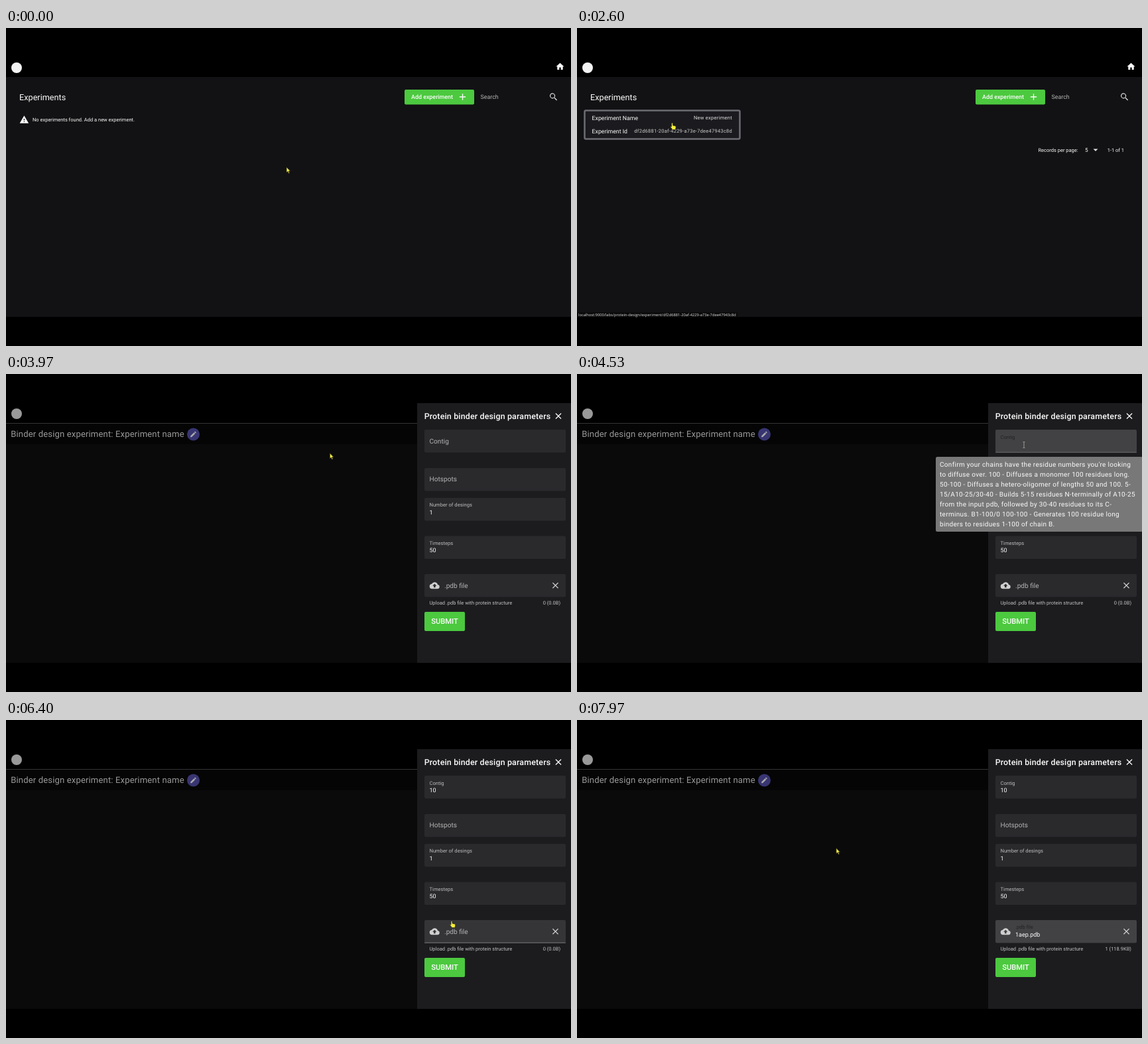
Write an HTML page that moves like this. It is 852 by 480 pixels and loops after 8000 ms.

```html
<!DOCTYPE html>
<html lang="en">
<head>
<meta charset="utf-8">
<title>Experiments</title>
<style>
  html, body { margin: 0; width: 100%; height: 100%; overflow: hidden; background: #000; }
  svg { display: block; }
  text { font-family: Roboto, sans-serif; text-rendering: geometricPrecision; white-space: pre; }
  .sys text, text.sys { font-family: "Open Sans", "Noto Sans", sans-serif; }
</style>
</head>
<body>
<svg id="stage" width="852" height="480" viewBox="0 0 852 480"></svg>
<script>
const LOOP = 8000;
const LIGHT = '#fcfcfc', MUTED = '#b4b4b4', GREEN = '#4cc93f', INK = '#444';
const PAGE = '#121214', PANEL = '#1c1c1f', FIELD = '#2a2a2d', FIELD_ACTIVE = '#424245';
const RUN_ID = 'df2d6881-20af-4229-a73e-7dee47943c8d';

const ICONS = {
  home: 'M10 20v-6h4v6h5v-8h3L12 3 2 12h3v8z',
  add: 'M19 13h-6v6h-2v-6H5v-2h6V5h2v6h6z',
  search: 'M15.5 14h-.8l-.3-.3A6.5 6.5 0 1 0 13.7 14.4l.3.3v.8l5 5 1.5-1.5zm-6 0a4.5 4.5 0 1 1 0-9 4.5 4.5 0 0 1 0 9z',
  warning: 'M1 21h22L12 2zm12-3h-2v-2h2zm0-4h-2v-4h2z',
  edit: 'M3 17.25V21h3.75L17.8 9.94l-3.75-3.75zM20.7 7.04a1 1 0 0 0 0-1.41l-2.34-2.34a1 1 0 0 0-1.41 0l-1.83 1.83 3.75 3.75z',
  close: 'M19 6.4 17.6 5 12 10.6 6.4 5 5 6.4 10.6 12 5 17.6 6.4 19 12 13.4 17.6 19 19 17.6 13.4 12z',
  upload: 'M19.35 10.04A7.5 7.5 0 0 0 5.35 8.04 6 6 0 0 0 6 20h13a5 5 0 0 0 .35-9.96zM14 13v4h-4v-4H7l5-5 5 5z',
};

// Markup helpers
const text = (x, y, str, size, fill = LIGHT, attrs = '') =>
  `<text x="${x}" y="${y}" font-size="${size}" fill="${fill}" ${attrs}>${str}</text>`;
const rect = (x, y, w, h, fill, attrs = '') =>
  `<rect x="${x}" y="${y}" width="${w}" height="${h}" fill="${fill}" ${attrs}/>`;
const circle = (x, y, r, fill, attrs = '') => `<circle cx="${x}" cy="${y}" r="${r}" fill="${fill}" ${attrs}/>`;
const line = (d, stroke, width = 1, attrs = '') =>
  `<path d="${d}" fill="none" stroke="${stroke}" stroke-width="${width}" ${attrs}/>`;
const group = (id, ...parts) => `<g id="${id}">${parts.join('')}</g>`;
const icon = (name, x, y, size, fill = LIGHT) =>
  `<path fill="${fill}" fill-rule="evenodd" d="${ICONS[name]}" transform="translate(${x - size / 2} ${y - size / 2}) scale(${size / 24})"/>`;
const MEDIUM = 'font-weight="500"', END = 'text-anchor="end"', MIDDLE = 'text-anchor="middle"';
const WIDE = 'letter-spacing=".033em"';

const listPage = group('list',
  rect(0, 74, 852, 362, PAGE),
  circle(16, 60, 8, '#f4f4f4'),
  icon('home', 835.5, 58.2, 14.4),
  text(20, 108.6, 'Experiments', 12.7),
  rect(601, 93, 105, 22.5, GREEN, 'rx="2"'),
  text(611, 107.2, 'Add experiment', 8.9, LIGHT, MEDIUM),
  icon('add', 688.5, 104, 16),
  text(715.5, 107.3, 'Search', 8.9, MUTED),
  icon('search', 825.7, 104, 15.2, '#dedede'),
  group('empty',
    icon('warning', 27.4, 138.3, 14.7),
    text(40, 141, 'No experiments found. Add a new experiment.', 7.5)),
  group('records',
    rect(11.5, 124.5, 234, 43, '#1b1b1f', 'rx="2" stroke="#6c6c73" stroke-width="2.5"'),
    text(22.6, 138.7, 'Experiment Name', 8.75),
    text(234, 138.4, 'New experiment', 7.55, '#dcdcdc', `${END} ${WIDE}`),
    text(22.6, 158.7, 'Experiment Id', 8.75),
    text(234, 158.4, RUN_ID, 7.5, '#cacaca', `${END} ${WIDE}`),
    text(695.5, 186.7, 'Records per page:', 7.5),
    text(766, 186.9, '5', 8.3),
    '<path d="M778.5 182.5h7l-3.5 3.5z" fill="#dedede"/>',
    text(825, 186.7, '1-1 of 1', 7.5, LIGHT, END)),
  group('status',
    rect(0, 429.5, 242, 7.5, '#080808'),
    text(2, 435.3, `localhost:9000/labs/protein-design/experiment/${RUN_ID}`, 5.75, '#e2e2e2', 'class="sys"')));

const designPage = group('design',
  rect(0, 75, 852, 31, '#050506'),
  rect(0, 106, 852, 330, '#0a0a0b'),
  rect(0, 74, 852, 1, '#343436'),
  circle(16, 60, 8, '#999'),
  text(7.2, 94.7, 'Binder design experiment: Experiment name', 13.1, '#999', 'letter-spacing=".01em"'),
  circle(282.5, 91, 9.5, '#383572'),
  icon('edit', 282.5, 91, 11.5, '#acacac'));

const field = (id, y) => rect(631, y, 213, 34.5, FIELD, `id="${id}" rx="2"`);
const bigLabel = (y, str, x = 638.5) => text(x, y, str, 10.1, MUTED);
const smallLabel = (y, str, x = 638.5, attrs = '') => text(x, y, str, 7.6, '#bababa', attrs);
const panel = group('panel',
  rect(620, 44, 232, 392, PANEL),
  text(630.7, 67.8, 'Protein binder design parameters', 12.45, LIGHT, `${MEDIUM} letter-spacing=".0125em"`),
  icon('close', 833, 63.5, 15.5),
  field('contigBox', 84),
  group('contigIdle', bigLabel(105, 'Contig')),
  group('contigFloat', smallLabel(97.6, 'Contig', 638.5, 'id="contigLabel"')),
  text(638.5, 109.3, '', 9, LIGHT, 'id="contigValue"'),
  rect(648.8, 101.5, 0.8, 9.5, LIGHT, 'id="caret"'),
  field('hotspotBox', 142), bigLabel(162.4, 'Hotspots'),
  field('countBox', 187), smallLabel(200, 'Number of desings'), text(638.5, 212.2, '1', 9),
  field('stepBox', 244.5), smallLabel(257.6, 'Timesteps'), text(638.5, 269.4, '50', 9),
  field('fileBox', 302),
  icon('upload', 646.3, 319.2, 15.2, '#cfcfcf'),
  icon('close', 828.5, 319.2, 15.5, '#cfcfcf'),
  group('fileIdle', bigLabel(322.6, '.pdb file', 661)),
  group('fileChosen', text(661, 315, '.pdb file', 7.6, '#222224'), text(661, 326.9, '1aep.pdb', 9)),
  rect(631, 117.8, 213, 0.8, '#77777a', 'id="contigLine"'),
  rect(631, 335.8, 213, 0.8, '#8a8a8c', 'id="fileLine"'),
  text(638.5, 347.6, 'Upload .pdb file with protein structure', 7.5, '#c2c2c2'),
  text(836, 347.6, '', 7.5, '#c2c2c2', `id="fileSize" ${END}`),
  rect(631, 359, 61, 29, GREEN, 'rx="2"'),
  text(661.5, 377, 'SUBMIT', 11.2, LIGHT, `${MEDIUM} ${MIDDLE}`));

const loading = group('loading',
  rect(0, 44, 852, 392, '#000', 'opacity=".32"'),
  circle(426.7, 221.3, 22.3, 'none', 'stroke="#6a6a6a" stroke-width="2"'),
  group('orbit', circle(405.6, 221.3, 3.8, '#bcbcbc')),
  text(426.8, 281.2, `Experiment ${RUN_ID}`, 8.75, '#c8c8c8', MIDDLE));

const tooltip = (id, x, y, w, h, lines) => group(id,
  rect(x, y, w, h, '#787878', 'rx="2.5"'),
  ...lines.map((str, i) => text(x + 6, y + 14.7 + 15 * i, str, 10, '#fafafa', 'letter-spacing=".031em"')));
const tips = tooltip('contigTip', 541, 125, 312, 113, [
  "Confirm your chains have the residue numbers you're looking",
  'to diffuse over. 100 - Diffuses a monomer 100 residues long.',
  '50-100 - Diffuses a hetero-oligomer of lengths 50 and 100. 5-',
  '15/A10-25/30-40 - Builds 5-15 residues N-terminally of A10-25',
  'from the input pdb, followed by 30-40 residues to its C-',
  'terminus. B1-100/0 100-100 - Generates 100 residue long',
  'binders to residues 1-100 of chain B.',
]) + tooltip('stepTip', 637, 285.5, 201, 22, ['Desired iterations to generate structure.']);

// File picker
const chevron = (x, y, open) =>
  line(open ? `M${x - 2} ${y - 1}l2 2 2-2` : `M${x - 1} ${y - 2}l2 2-2 2`, '#6a6a6a', 0.8);
const sideText = (x, y, str) => text(x, y + 2.1, str, 5.85, INK);
const shapes = {
  house: (x, y) => `<path d="M${x - 4} ${y}l4-4 4 4h-1v4h-6v-4z" fill="#b98a62"/>`,
  screen: (x, y, c) => rect(x - 4, y - 3.5, 8, 6, c, 'rx="1"') + rect(x - 2, y + 3, 4, 1, c),
  picture: (x, y, c) => rect(x - 4, y - 3.5, 8, 7, c, 'rx="1"') + `<path d="M${x - 3} ${y + 3}l3-3 3 3z" fill="#e8f2ef"/>`,
  arrow: (x, y, c) => line(`M${x} ${y - 4}v5.5m-2.5-2.5l2.5 2.5 2.5-2.5M${x - 3} ${y + 3.5}h6`, c),
  page: (x, y, c) => rect(x - 3, y - 4, 6, 8, c, 'rx="1"') + line(`M${x - 1.5} ${y - 1}h3m-3 2h3`, '#fff', 0.7),
  disc: (x, y, c) => circle(x, y, 3.8, c),
  film: (x, y, c) => rect(x - 4, y - 3.5, 8, 7, c, 'rx="1"') + `<path d="M${x - 1} ${y - 2}l3 2-3 2z" fill="#fff"/>`,
  drive: (x, y, c) => rect(x - 4, y, 8, 2.5, '#505050') + (c ? rect(x - 4, y - 3, 3, 3, c) : ''),
};
const places = [
  ['Home', 49, 'house'], ['Gallery', 65, 'picture', '#2f8bb8'], ['NimVault - Personal', 81, 'disc', '#2486cf'],
  ['Desktop', 113, 'screen', '#2aa198'], ['Downloads', 129, 'arrow', '#45a06a'], ['Documents', 145, 'page', '#6d8794'],
  ['Pictures', 161, 'picture', '#2f8bb8'], ['Music', 177, 'disc', '#c9652c'], ['Videos', 193, 'film', '#7a45ad'],
  ['This PC', 225, 'screen', '#2aa198'], ['Lumenor 10 (C:)', 241, 'drive', '#2486cf'],
  ['Local Disk (D:)', 257, 'drive'], ['Network', 273, 'screen', '#2aa198'],
];
const pin = y => line(`M114 ${y + 2}l1.8-1.8m-1-1.2l2.2 2.2m-1-3.4l2.3 2.3-1.5 1`, '#707070', 0.9);
const doc = x => {
  const d = `M${x} 64h21l12 12v28h-33z`;
  return line(d, '#2b2b2b', 4, 'stroke-linejoin="round"') +
    `<path d="M${x + 20} 63v14h14z" fill="#2b2b2b"/>` +
    line(`M${x + 6} 77h9M${x + 6} 85h21M${x + 12} 93h15`, '#2b2b2b', 3) +
    circle(x, 96, 13, '#fff') + circle(x, 96, 11, '#222');
};
const picker = `<g class="sys">` + group('picker',
  '<path d="M3.5 44h629v267a4 4 0 0 1-4 4h-621a4 4 0 0 1-4-4z" fill="#fff"/>',
  rect(3.5, 44, 117, 229, '#fbfbfb'),
  rect(7, 44, 112, 12, '#d9d9d9'),
  rect(120.5, 44, 8, 229, '#f2f2f2'),
  rect(122.5, 44, 4, 179.5, '#808080', 'rx="2"'),
  line('M9 97h111M9 209h111', '#e2e2e2', 0.8),
  ...places.map(([name, y, kind, color]) => {
    const indent = kind === 'drive' ? 4 : 0;
    return shapes[kind](25 + indent, y, color) + sideText(30 + indent, y, name);
  }),
  ...[113, 129, 145, 161, 177, 193].map(pin),
  chevron(12, 81), chevron(12, 225, true), chevron(16, 241), chevron(16, 257), chevron(16, 273),
  chevron(136.5, 47, true), sideText(141, 47, 'Today'),
  rect(202, 57, 54, 63, '#dcebf7', 'id="picked" rx="2"'),
  doc(153), doc(215),
  text(167, 115.6, '1aep_designed.pdb', 5.75, INK, MIDDLE),
  text(229, 115.6, '1aep.pdb', 5.75, INK, MIDDLE),
  '<path d="M3.5 273h629v38a4 4 0 0 1-4 4h-621a4 4 0 0 1-4-4z" fill="#f3f3f3"/>',
  text(91, 289.3, 'File name:', 5.85, INK, END),
  rect(95, 282, 428.5, 11, '#fff', 'stroke="#b8b8b8" stroke-width=".8"'),
  text(98, 289.6, '1aep.pdb', 5.85, INK, 'id="pickedName"'),
  chevron(519, 287.5, true),
  rect(529, 282, 94, 11, '#fbfbfb', 'stroke="#d4d4d4" stroke-width=".6"'),
  text(531, 289.5, 'Program Debug Database (*.pd', 5.7, INK),
  chevron(619, 287.5, true),
  rect(530, 296.5, 43, 12, '#fdfdfd', 'rx="2" stroke="#8c8c8c" stroke-width=".8"'),
  rect(580, 296.5, 42.5, 12, '#fdfdfd', 'rx="2" stroke="#d0d0d0" stroke-width=".7"'),
  text(551.5, 304.6, 'Open', 5.85, INK, MIDDLE),
  text(601, 304.6, 'Cancel', 5.85, INK, MIDDLE)) + '</g>';

const pointerStyle = 'fill="#f4ee3c" stroke="#222" stroke-width=".7"';
const cursor = group('cursor',
  `<path id="arrow" ${pointerStyle} d="M0 0v8.2l1.9-1.7 1.3 3 1.4-.6-1.3-2.9h2.5z"/>`,
  `<path id="hand" ${pointerStyle} d="M-1 1q1-1.500 2 0v3l4 1q1 .5.700 2l-.7 3.500h-4.500l-3-4q0-1.500 1.500-.5z"/>`,
  line('M-1.500-4.500h1l.5.5.5-.5h1M0-4v8m-1.500.5h1l.5-.5.5.5h1', '#b5b5a8', 0.8, 'id="beam"'));

document.getElementById('stage').innerHTML =
  rect(0, 0, 852, 480, '#000') + listPage + designPage + panel + loading + tips + picker + cursor;

// Timing
const T = {
  added: 1200, hover: 2230, opened: 2630, loaded: 3500, focused: 4350,
  typed1: 5000, typed2: 5180, fileClick: 6350, picker: 6520, picked: 7270, closed: 7500,
};
const PATH = [
  [570, 423, 210], [1000, 650, 103], [1650, 650, 103], [2450, 143.5, 143],
  [3550, 143.5, 143], [4250, 674, 107], [5220, 674, 107], [5600, 698, 291],
  [5720, 698, 291], [5950, 672, 303], [6680, 672, 303], [7218, 226, 79],
  [7680, 226, 79], [8374, 660, 380],
];

const el = id => document.getElementById(id);
const show = (id, on) => el(id).setAttribute('visibility', on ? 'inherit' : 'hidden');
const fade = (id, amount) => el(id).setAttribute('opacity', amount);
const fill = (id, color) => el(id).setAttribute('fill', color);
const clamp = v => Math.max(0, Math.min(1, v));
const ramp = (t, start, end) => clamp((t - start) / (end - start));
const smooth = u => u * u * (3 - 2 * u);
const between = (t, a, b) => t >= a && t < b;

function pointerAt(t) {
  let pos = PATH[0].slice(1);
  for (let i = 1; i < PATH.length && t > PATH[i - 1][0]; i++) {
    const [t0, x0, y0] = PATH[i - 1], [t1, x1, y1] = PATH[i];
    const u = smooth(ramp(t, t0, t1));
    pos = [x0 + (x1 - x0) * u, y0 + (y1 - y0) * u];
  }
  return pos;
}

function render(t) {
  const onList = t < T.opened;
  show('list', onList);
  show('empty', onList && t < T.added);
  show('records', onList && t >= T.added);
  show('status', between(t, T.hover, T.opened));

  show('design', !onList);
  show('panel', !onList);
  const slide = 232 * (1 - smooth(ramp(t, T.opened, T.opened + 250)));
  el('panel').setAttribute('transform', `translate(${slide} 0)`);
  show('loading', !onList);
  fade('loading', ramp(t, T.opened, T.opened + 150) * (1 - ramp(t, T.loaded, T.loaded + 150)));
  el('orbit').setAttribute('transform', `rotate(${(t - T.opened) * 0.18} 426.7 221.3)`);

  const focused = between(t, T.focused, T.fileClick);
  const floated = !onList && t >= T.focused;
  show('contigIdle', !onList && !floated);
  show('contigFloat', floated);
  fill('contigLabel', focused ? '#222224' : '#bababa');
  fill('contigBox', focused ? FIELD_ACTIVE : FIELD);
  show('contigLine', focused);
  el('contigValue').textContent = t < T.typed1 ? '' : t < T.typed2 ? '1' : '10';
  el('caret').setAttribute('x', t < T.typed2 ? 643.7 : 648.7);
  show('caret', focused && t >= T.typed1 && (t - T.typed2) % 1060 < 530);
  fade('contigTip', ramp(t, 4150, 4350) * (1 - ramp(t, 5250, 5400)));
  fade('stepTip', ramp(t, 5450, 5600) * (1 - ramp(t, 5780, 5930)));

  const chosen = t >= T.closed;
  show('fileIdle', !onList && !chosen);
  show('fileChosen', chosen);
  show('fileLine', between(t, T.fileClick, T.closed));
  fill('fileBox', chosen ? FIELD_ACTIVE : t >= T.fileClick ? '#353538' : FIELD);
  el('fileSize').textContent = chosen ? '1 (118.9KB)' : '0 (0.0B)';

  const picking = between(t, T.picker, T.closed);
  show('picker', picking);
  show('picked', picking && t >= T.picked);
  show('pickedName', picking && t >= T.picked);

  const [x, y] = pointerAt(t);
  el('cursor').setAttribute('transform', `translate(${x} ${y})`);
  const onButton = between(t, 930, 1800) && x > 601 && y < 116;
  const onFile = between(t, 5900, T.picker);
  const hand = onButton || between(t, T.hover, T.opened) || onFile;
  const beam = between(t, 4100, 5270);
  show('hand', hand);
  show('beam', beam);
  show('arrow', !hand && !beam);
}

function tick() {
  render(performance.now() % LOOP);
  requestAnimationFrame(tick);
}
tick();
</script>
</body>
</html>
```
